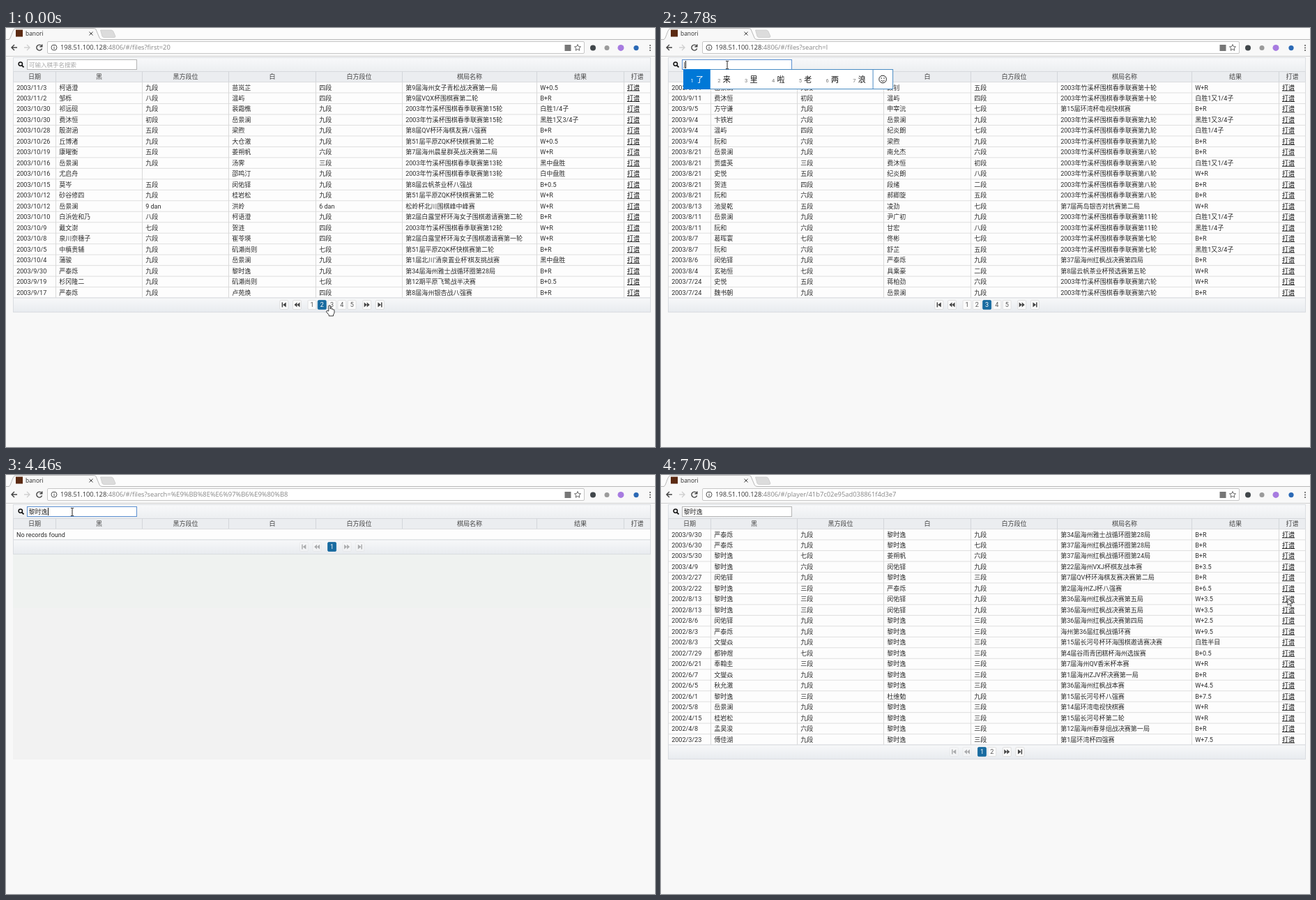
An HTML page that plays this animation: 931x601 px, repeating every 8 s.

```html
<!DOCTYPE html>
<html lang="zh-CN">
<head>
<meta charset="utf-8">
<title>banori</title>
<style>
html, body { margin: 0; width: 100%; height: 100%; overflow: hidden; background: #f8f8f8; }
svg { display: block; }
text { font: 9.05px Roboto, "Noto Sans CJK SC", sans-serif; fill: #2c2c2c; white-space: pre; }
.ui { font: 9.35px "Open Sans", "Noto Sans", sans-serif; }
.mid { text-anchor: middle; }
.head { fill: #444; }
.link { text-decoration: underline; fill: #111; }
</style>
</head>
<body>
<script>
const LOOP = 8000, NAME = '黎时逸', ROW = 15.48, TOP = 77.5;
const COLS = [10.5, 71.5, 195.5, 319.5, 444.5, 568.5, 761.5, 886.5, 924.5];
const HEADS = ['日期', '黑', '黑方段位', '白', '白方段位', '棋局名称', '结果', '打谱'];
const LEAGUE = '2003年竹溪杯围棋春季联赛第';

// Rows: date|black|rank|white|rank|event|result; @ is the searched player, ^ the league.
const PAGE2 = `2003/11/3|柯语澄|九段|苗岚芷|四段|第9届海州女子青松战决赛第一局|W+0.5
2003/11/2|邹栎|八段|温屿|四段|第9届VQX杯围棋赛第二轮|B+R
2003/10/30|祁远砚|九段|裴霜樵|九段|^15轮|白胜1/4子
2003/10/30|费沐恒|初段|岳景澜|九段|^15轮|黑胜1又3/4子
2003/10/28|殷澍涵|五段|梁煦|九段|第8届QV杯环海棋友赛八强赛|B+R
2003/10/26|丘博渚|九段|大仓澈|九段|第51届平原ZQK杯快棋赛第二轮|W+0.5
2003/10/19|康曜衡|五段|姜朔帆|六段|第7届海州晨星群英战决赛第二局|W+R
2003/10/16|岳景澜|九段|汤霁|三段|^13轮|黑中盘胜
2003/10/16|尤启舟||邵鸣汀|九段|^13轮|白中盘胜
2003/10/15|莫岑|五段|闵佑铎|九段|第8届云帆茶业杯八强战|B+0.5
2003/10/12|砂谷修四|九段|桂岩松|九段|第51届平原ZQK杯快棋赛第二轮|W+R
2003/10/12|岳景澜|9 dan|洪岭|6 dan|松岭杯北川围棋峰中峰赛|W+R
2003/10/10|白浜佐和乃|八段|柯语澄|九段|第2届白露堂杯环海女子围棋邀请赛第二轮|B+R
2003/10/9|戴文澍|七段|贺涟|四段|^12轮|W+R
2003/10/8|泉川奈穗子|六段|崔苓瑛|四段|第2届白露堂杯环海女子围棋邀请赛第一轮|W+R
2003/10/5|中槙贵辅|九段|矶濑尚则|七段|第51届平原ZQK杯快棋赛第二轮|B+R
2003/10/4|蒲骏|九段|岳景澜|九段|第1届北川'清泉置业杯'棋友挑战赛|黑中盘胜
2003/9/30|严泰烁|九段|@|九段|第34届海州雅士战循环圈第28局|B+R
2003/9/19|杉冈隆二|九段|矶濑尚则|七段|第12期平原飞鹭战半决赛|B+0.5
2003/9/17|严泰烁|九段|卢苑焕|四段|第8届海州银杏战八强赛|B+R`;

const PAGE3 = `2003/9/11|岳景澜|九段|顾钊|五段|^十轮|W+R
2003/9/11|费沐恒|初段|温屿|四段|^十轮|白胜1又1/4子
2003/9/5|方守谦|九段|申宰沅|七段|第15届环湾杯电视快棋赛|B+R
2003/9/4|卞铁岩|六段|岳景澜|九段|^九轮|黑胜1又3/4子
2003/9/4|温屿|四段|纪炎朗|七段|^九轮|白胜1/4子
2003/9/4|阮和|六段|梁煦|九段|^九轮|B+R
2003/8/21|岳景澜|九段|南允杰|六段|^八轮|B+R
2003/8/21|贾盛英|三段|费沐恒|初段|^八轮|白胜1又1/4子
2003/8/21|史悦|五段|纪炎朗|八段|^八轮|W+R
2003/8/21|贺涟|四段|段绪|二段|^八轮|B+R
2003/8/21|阮和|六段|郝卿旋|五段|^八轮|B+R
2003/8/13|池旻乾|五段|凌劲|七段|第7届两岛银杏对抗赛第二局|W+R
2003/8/11|岳景澜|九段|尹广初|九段|^11轮|白胜1又1/4子
2003/8/11|阮和|六段|甘宏|八段|^11轮|黑胜1/4子
2003/8/7|葛晖寰|七段|佟彬|七段|^七轮|B+R
2003/8/7|阮和|六段|舒芷|五段|^七轮|黑胜1又3/4子
2003/8/6|闵佑铎|九段|严泰烁|九段|第37届海州红枫战决赛第四局|B+R
2003/8/4|玄祐恒|七段|具乘豪|二段|第8届云帆茶业杯预选赛第五轮|W+R
2003/7/24|史悦|五段|蒋柏劲|六段|^六轮|W+R
2003/7/24|魏书朝|九段|岳景澜|九段|^六轮|B+R`;

const PARTIAL = `2001/10/15|linweiqiu蔺维秋|9P|yuejinglan岳景澜|9P|98river liuyun final|B+R
2001/10/2|骆励和luolihe|9p|岳景澜yuejinglan|9p|98 redpine 4->2|W+4.5
2001/4/23|厉燮焱 lixieyan|9P|梁煦liang xu|8P|1st qiu shui cup|W+0.5
1999/2/7|魏书朝wei shuchao|9P|凌劲lingjin|4P|bqtv快棋赛|W+R
1998/12/28|练泽予lian zeyu|4p|方守谦 fangshouqian|9p|秋水杯第2轮the first qiushui weiqi match 2nd game|w+4.5
1970/1/1|邬泰wu tai|7P|黎予汀li yuting|6P|第二届丰谷堂预选第二轮|B+R`;

const FOUND = `2003/9/30|严泰烁|九段|@|九段|第34届海州雅士战循环圈第28局|B+R
2003/6/30|严泰烁|九段|@|七段|第37届海州红枫战循环圈第28局|B+R
2003/5/30|@|七段|姜朔帆|六段|第37届海州红枫战循环圈第24局|B+R
2003/4/9|@|六段|闵佑铎|九段|第22届海州VXJ杯棋友战本赛|B+3.5
2003/2/27|闵佑铎|九段|@|三段|第7届QV杯环海棋友赛决赛第二局|B+R
2003/2/22|@|三段|严泰烁|九段|第2届海州ZJ杯八强赛|B+6.5
2002/8/13|@|三段|闵佑铎|九段|第36届海州红枫战决赛第五局|W+3.5
2002/8/13|@|三段|闵佑铎|九段|第36届海州红枫战决赛第五局|W+3.5
2002/8/6|闵佑铎|九段|@|三段|第36届海州红枫战决赛第四局|W+2.5
2002/8/3|严泰烁|九段|@|三段|海州第36届红枫战循环赛|W+9.5
2002/8/3|文燮焱|九段|@|三段|第15届长河号杯环海围棋邀请赛决赛|白胜半目
2002/7/29|都钟煜|七段|@|三段|第4届谷雨青团糕杯海州选拔赛|B+0.5
2002/6/21|奉翰圭|三段|@|三段|第7届海州QV香米杯本赛|W+R
2002/6/7|文燮焱|九段|@|三段|第1届海州ZJV杯决赛第一局|B+R
2002/6/5|秋允澈|九段|@|三段|第36届海州红枫战本赛|W+4.5
2002/6/1|@|三段|杜维勉|九段|第15届长河号杯八强赛|B+7.5
2002/5/8|岳景澜|九段|@|三段|第14届环湾电视快棋赛|W+R
2002/4/15|桂岩松|九段|@|三段|第15届长河号杯第二轮|W+R
2002/4/8|孟昊浚|六段|@|三段|第12届海州春芽组战决赛第一局|B+R
2002/3/23|傅佳湖|九段|@|三段|第1届环湾杯四强赛|W+7.5`;

const WORDS = {
  one: '里 李 离 力 理 利 丽', two: '历史 历时 理事 力士 离世 利是 立式',
  first: '了 来 里 啦 老 两 浪', three: NAME + ' 理事椅 力士衣 立式仪 历史遗 历史 理事'
};

const make = (parent, tag, attrs = {}, content) => {
  const e = document.createElementNS('http://www.w3.org/2000/svg', tag);
  for (const k in attrs) e.setAttribute(k, attrs[k]);
  if (content !== undefined) e.textContent = content;
  parent.append(e);
  return e;
};
const rect = (p, x, y, width, height, fill, more) => make(p, 'rect', { x, y, width, height, fill, ...more });
const path = (p, d, stroke, more) => make(p, 'path', { d, stroke, fill: 'none', ...more });
const text = (p, x, y, s, cls = '', more) => make(p, 'text', { x, y, class: cls, ...more }, s);
const dot = (p, cx, cy, r, fill, more) => make(p, 'circle', { cx, cy, r, fill, ...more });
const show = (e, on) => e.style.display = on ? '' : 'none';

const svg = make(document.body, 'svg', { width: 931, height: 601, viewBox: '0 0 931 601' });
const defs = make(svg, 'defs');
const gradient = (id, a, b) => {
  const g = make(defs, 'linearGradient', { id, x2: 0, y2: 1 });
  make(g, 'stop', { 'stop-color': a });
  make(g, 'stop', { offset: 1, 'stop-color': b });
};
gradient('bar', '#f8f9fa', '#eceef1');
gradient('foot', '#f7f8f9', '#e8ebef');
rect(svg, 0, 0, 931, 601, '#f8f8f8');

// Browser frame
rect(svg, 0, 0, 931, 16, '#fcfcfc');
path(svg, 'M0 16.5H4C7 16 9 3 12 1.5Q13 .5 15 .5H125Q128 .5 129 2L134 14Q135 16.5 138 16.5H931', '#b9b9b9', { fill: '#f8f8f8' });
path(svg, 'M135.5 3H151Q153 3 154 5L157 12Q157 13.5 155 13.5H141Q139 13.5 138 12Z', '#c4c4c4', { fill: '#dcdcdc', 'stroke-width': .7 });
rect(svg, 14, 2.5, 10, 10, '#5b2a12');
text(svg, 28, 10.8, 'banori', 'ui', { style: 'font-size:8.4px' });
path(svg, 'M119.5 5.5l5 5m0-5l-5 5', '#444');
path(svg, 'M16 28H8m4-4l-4 4 4 4', '#444', { 'stroke-width': 1.4 });
path(svg, 'M26 28h8m-4-4l4 4-4 4', '#cfcfcf', { 'stroke-width': 1.3 });
path(svg, 'M51 25.6A4 4 0 1 0 51.6 29.5M51.8 23.4v3.4h-3.4', '#444', { 'stroke-width': 1.4 });
rect(svg, 59.5, 19.5, 770, 17, '#fff', { rx: 1.5, stroke: '#c6c6c6' });
dot(svg, 69, 28, 4, 'none', { stroke: '#555' });
path(svg, 'M69 27.3v3M69 25.2v1.1', '#555', { 'stroke-width': 1.1 });
const url = text(svg, 78, 31.4, '', 'ui');
make(url, 'tspan', { fill: '#333' }, '198.51.100.128');
const route = make(url, 'tspan', { fill: '#858585' });
rect(svg, 801.5, 24, 9, 9, '#777');
path(svg, 'M820 23.6l1.3 3 3.2.3-2.4 2.1.7 3.2-2.8-1.7-2.8 1.7.7-3.2-2.4-2.1 3.2-.3z', '#555', { 'stroke-width': .9 });
dot(svg, 842, 28.4, 4, '#40464a');
dot(svg, 862, 28.4, 3.5, '#9a9a9a');
dot(svg, 882, 28.4, 4.5, '#a77be0');
dot(svg, 904, 28.6, 3.6, '#2b69b5');
for (const y of [25, 28.5, 32]) dot(svg, 924, y, 1, '#555');
path(svg, 'M0 40.5H931', '#d0d0d0');

const ghost = rect(svg, 10, 113, 915, 295, '#f2f2f2');
const tint = rect(svg, 10, 113, 915, 78, '#eff2f0');

// Search bar and column heads
rect(svg, 10.5, 42.5, 914, 20, 'url(#bar)', { stroke: '#dcdfe3' });
dot(svg, 20.8, 51.6, 2.7, 'none', { stroke: '#111', 'stroke-width': 1.5 });
path(svg, 'M22.8 53.6l2.7 2.7', '#111', { 'stroke-width': 1.8 });
const box = rect(svg, 30.5, 45.5, 157, 14, '#fff');
const hint = text(svg, 33, 55.6, '可输入棋手名搜索', '', { style: 'font-size:8.5px;fill:#a6a6a6' });
const typed = text(svg, 32.5, 55.5, '');
const caret = rect(svg, 32, 47, 1, 11, '#111');
rect(svg, 10.5, 62.5, 914, 15, '#ebedf0', { stroke: '#d6d9dd' });
HEADS.forEach((h, i) => {
  text(svg, (COLS[i] + COLS[i + 1]) / 2, 73, h, 'mid head');
  if (i) path(svg, `M${COLS[i]} 62V78`, '#d3d6da');
});

function pager(p, y, count, active, back, next) {
  rect(p, 10.5, y, 914, 20.5, 'url(#foot)', { stroke: '#d9dce0' });
  const start = 467.6 - (count - 1) * 7.15, end = start + (count - 1) * 14.3, cy = y + 10;
  const arrow = (x, dir, bar, on) => {
    const g = make(p, 'g', { transform: `translate(${x} ${cy}) scale(${dir} 1)`, opacity: on ? 1 : .4 });
    rect(g, -6, -6.5, 12, 13, '#fbfbfb', { rx: 1.5, stroke: '#d9d9d9', 'stroke-width': .8 });
    const d = bar ? 'M-3.2-3.5h1.5v7h-1.5zM3-3.5v7L-1.6 0z' : 'M0-3.5v7L-4 0zM4-3.5v7L0 0z';
    make(g, 'path', { d, fill: '#444' });
  };
  arrow(start - 40.2, 1, true, back);
  arrow(start - 21.5, 1, false, back);
  arrow(end + 21.5, -1, false, next);
  arrow(end + 40.2, -1, true, next);
  for (let i = 0; i < count; i++) {
    const on = i + 1 === active, x = start + i * 14.3;
    rect(p, x - 6, cy - 6.5, 12, 13, on ? '#186ba0' : '#fbfbfb', { rx: 1.5, stroke: on ? '#186ba0' : '#dcdcdc', 'stroke-width': .8 });
    text(p, x, cy + 3.3, i + 1, 'mid', { style: `fill:${on ? '#fff' : '#555'}` });
  }
}

function table(data, ...pages) {
  const g = make(svg, 'g'), rows = data ? data.split('\n') : [], n = rows.length || 1;
  const bottom = TOP + n * ROW;
  rect(g, 10.5, TOP, 914, n * ROW, '#fdfdfd', { stroke: '#dadcdf' });
  if (!data) text(g, 15, 88.5, 'No records found');
  rows.forEach((row, r) => {
    const y = TOP + r * ROW;
    if (r) path(g, `M10 ${y}H925`, '#dcdcdc', { 'stroke-width': .9 });
    const cells = row.replace('@', NAME).replace('^', LEAGUE).split('|');
    cells.forEach((s, i) => {
      const cell = make(g, 'svg', { x: COLS[i], y, width: COLS[i + 1] - COLS[i], height: ROW });
      text(cell, 4.7, 11, s);
    });
    text(g, 891, y + 11, '打谱', 'link');
  });
  if (data) for (const x of COLS.slice(1, 8)) path(g, `M${x} ${TOP}V${bottom}`, '#d9d9d9');
  pager(g, bottom, ...pages);
  return g;
}
const tables = {
  page2: table(PAGE2, 5, 2, true, true), page3: table(PAGE3, 5, 3, true, true),
  partial: table(PARTIAL, 1, 1), none: table('', 1, 1), found: table(FOUND, 2, 1, false, true)
};

// Input method popup, drawn from its own left edge
function popup(list) {
  const g = make(svg, 'g'), words = list.split(' ');
  const widths = words.map(w => 27.8 + 11 * w.length), total = widths.reduce((a, b) => a + b, 0);
  rect(g, .5, 59.5, total + 28.5, 28, '#fff', { stroke: '#4a8cc4' });
  rect(g, 0, 59, widths[0], 29, '#0078d7');
  let x = 0;
  words.forEach((w, i) => {
    text(g, x + 10.5, 78, i + 1, '', { style: `font-size:7.5px;fill:${i ? '#777' : '#fff'}` });
    text(g, x + 18, 78, w, '', { style: `font-size:11px;fill:${i ? '#111' : '#fff'}` });
    x += widths[i];
  });
  path(g, `M${total + .5} 59V88`, '#4a8cc4');
  dot(g, total + 14.5, 73.5, 5.3, 'none', { stroke: '#222' });
  path(g, `M${total + 11.8} 75q2.7 3 5.4 0`, '#222', { 'stroke-width': .9 });
  for (const dx of [12.6, 16.4]) dot(g, total + dx, 72, .8, '#222');
  return g;
}
const popups = Object.fromEntries(Object.entries(WORDS).map(([k, w]) => [k, popup(w)]));

const cursors = {
  arrow: path(svg, 'M0 0V9.8L2.3 7.7 4 11.3 5.4 10.7 3.8 7.2H7Z', '#222', { fill: '#fff', 'stroke-width': .8 }),
  hand: path(svg, 'M-1.2 8V1Q-1.2-.2 0-.2T1.2 1V5Q3-.0 3.4 5.4 5 4.4 5.4 6 7 5.4 7 7.4V10Q6.8 12 5.5 13V15H-.8V13.5L-4.6 9Q-5-.0-1.2 8Z'.replace('-5-.0', '-4.4 6.6'), '#222', { fill: '#fff', 'stroke-width': .9 }),
  beam: path(svg, 'M-2-5.5H-.5L0-5 .5-5.5H2M0-5V5M-2 5.5H-.5L0 5 .5 5.5H2', '#222', { 'stroke-width': 1 })
};

const find = q => '/#/files?search=' + encodeURIComponent(q);
const query = (at, q, list, name) => ({ at, q, list, route: find(q), ...(name && { name }) });
const STEPS = [
  { at: 0, name: 'page2', route: '/#/files?first=20', q: '', list: '', focus: false },
  { at: 280, name: 'page3', route: '/#/files?first=40' },
  { at: 1260, focus: true },
  query(2780, 'l', 'first'),
  query(2910, 'li', 'one', 'partial'),
  query(3030, "li's", 'two'),
  query(3170, "li'sh", 'two', 'none'),
  query(3320, "li'shi", 'two'),
  query(3440, "li'shi'y", 'three'),
  query(3720, "li'shi'yi", 'three'),
  { at: 4310, q: NAME, list: '' },
  { at: 4460, route: find(NAME) },
  { at: 4610, name: 'found' },
  { at: 7580, focus: false, route: '/#/player/41b7c02e95ad038861f4d3e7' }
];
const BLINK = [[1260, 1780], [2360, 5010], [5540, 6150], [6710, 7130]];

const smooth = p => p * p * (3 - 2 * p);
// Sampled progress: the pointer jumps once per step
const sample = (t, from, to, steps) => {
  const k = Math.floor((t - from) / ((to - from) / (steps - 1)) + 1e-6) + 1;
  return smooth(Math.min(1, k / steps));
};
const curve = (p, a, b, c) => (1 - p) ** 2 * a + 2 * p * (1 - p) * b + p * p * c;

function pointer(t) {
  if (t < 420) return ['hand', 464, 398];
  if (t < 1260) {
    const p = sample(t, 420, 1120, 6);
    return [p < 1 ? 'arrow' : 'beam', curve(p, 464, 300, 95), curve(p, 398, 190, 53)];
  }
  if (t < 5010) return ['beam', 95, 53];
  if (t < 6150) {
    const p = sample(t, 5010, 6030, 8);
    return ['arrow', curve(p, 95, 480, 844), curve(p, 53, 330, 129)];
  }
  if (t < 7280) {
    const p = smooth(Math.floor((t - 6150) / 140 + 1e-6) / 7);
    return ['arrow', curve(p, 842, 875, 899), curve(p, 128.5, 158, 177)];
  }
  return t < 7700 ? ['hand', 900, 177] : ['arrow', 899, 177];
}

function draw(t) {
  const s = Object.assign({}, ...STEPS.filter(x => x.at <= t));
  for (const k in tables) show(tables[k], k === s.name);
  route.textContent = ':4806' + s.route;
  typed.textContent = s.q;
  typed.style.textDecoration = s.list ? 'underline' : 'none';
  show(hint, !s.q);
  box.setAttribute('stroke', s.focus ? '#5b8fd0' : '#b5b5b5');
  const end = s.q ? 32.5 + typed.getComputedTextLength() : 32;
  caret.setAttribute('x', Math.round(end));
  show(caret, BLINK.some(([a, b]) => t >= a && t < b));
  for (const k in popups) {
    show(popups[k], k === s.list);
    popups[k].setAttribute('transform', `translate(${Math.round(end - 3)} 0)`);
  }
  show(ghost, s.name === 'partial' || s.name === 'none');
  show(tint, s.name === 'none');
  const [kind, x, y] = pointer(t);
  for (const k in cursors) show(cursors[k], k === kind);
  cursors[kind].setAttribute('transform', `translate(${x} ${y})`);
}

const began = performance.now();
function tick() {
  draw((performance.now() - began) % LOOP);
  requestAnimationFrame(tick);
}
tick();
</script>
</body>
</html>
```
